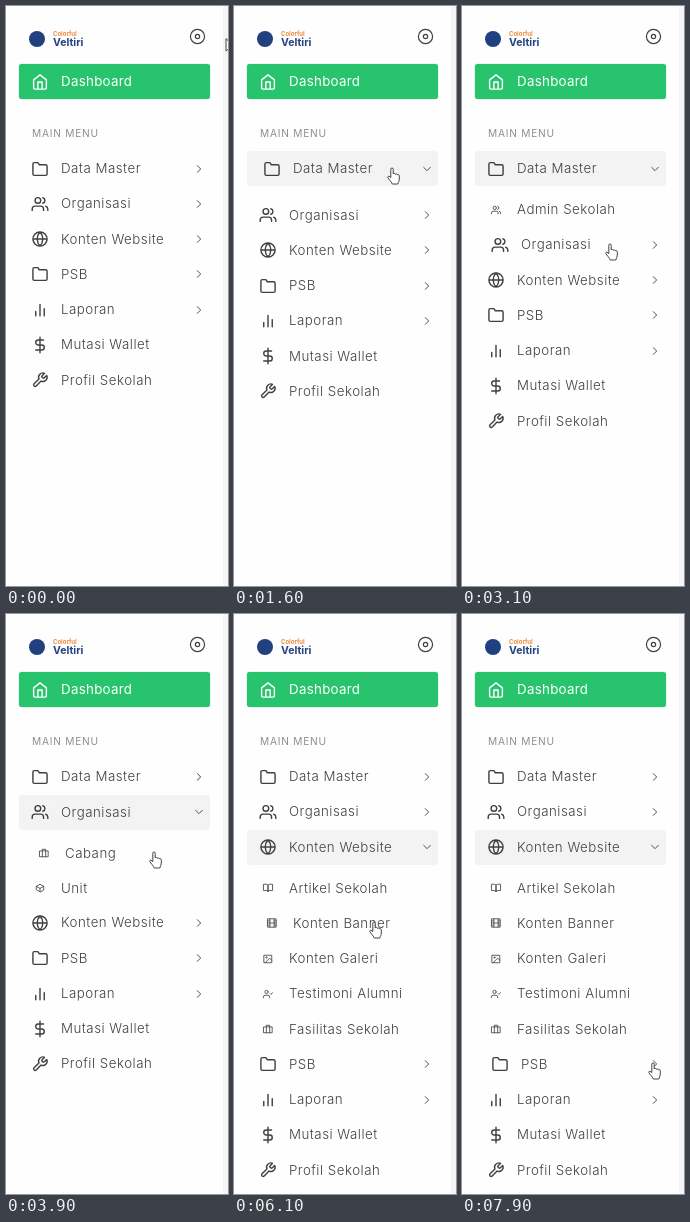
These frames come from a looping animation (222x580 px, 8000 ms). An HTML page:

```html
<!DOCTYPE html>
<html lang="id">
<head>
<meta charset="utf-8">
<title>Sidebar menu</title>
<style>
html, body { margin: 0; width: 100%; height: 100%; overflow: hidden; background: #fefefe; }
body { position: relative; font: 300 13.3px/35.25px Inter, sans-serif; letter-spacing: .5px; color: #404044; }
body > * { position: absolute; }
svg { fill: none; stroke: currentColor; stroke-width: 2; stroke-linecap: round; stroke-linejoin: round; overflow: visible; }
.edge { left: 217px; top: 0; width: 5px; height: 100%; background: #f5f5f5; }
.mark { left: 23px; top: 25px; width: 16px; height: 16px; border-radius: 50%; background: #20407f; }
.brand { left: 47px; white-space: nowrap; font-weight: 700; letter-spacing: 0; }
.small { top: 24px; font-size: 6px; line-height: 8px; color: #f08a3c; }
.big { top: 30px; font-size: 10.5px; line-height: 13px; color: #20407f; }
.target { left: 183.2px; top: 22.3px; stroke-width: 1.7; }
.title { left: 26px; top: 119px; font-size: 10.2px; line-height: 17px; font-weight: 400; letter-spacing: .75px; color: #8e8e92; }
#menu { left: 13px; top: 145px; width: 191px; }
.row { position: relative; height: 35.25px; border-radius: 3px; white-space: nowrap; }
.row .label { position: absolute; left: 42px; }
.row .icon { position: absolute; top: 17.6px; left: 21px; transform: translate(-50%, -50%); }
.row .arrow { position: absolute; left: 175.3px; top: 12.6px; stroke-width: 2.2; }
.home { left: 13px; top: 58px; width: 191px; background: #27c46d; box-shadow: 0 0 1px #27c46d; color: #fff; font-weight: 400; letter-spacing: .3px; }
.sub { overflow: hidden; height: 0; }
.sub .row:first-child { margin-top: 5.8px; }
#cursor { left: 0; top: 0; color: #444; stroke-width: 1; }
#cursor path { fill: #fff; }
</style>
</head>
<body>
<div class="edge"></div>
<div class="mark"></div>
<div class="brand small">Colorful</div>
<div class="brand big">Veltiri</div>
<svg class="target" width="17" height="17" viewBox="0 0 24 24"><circle cx="12" cy="12" r="10"/><circle cx="12" cy="12" r="3"/></svg>
<div class="title">MAIN MENU</div>
<div id="menu"></div>
<svg id="cursor" width="14" height="18">
  <path id="pointer" d="M0 0V12L3 9.5 5 14 7 13 5 8.7H9Z"/>
  <path id="hand" d="M-.2 9V1.2a1.2 1.2 0 0 1 2.4 0V6c.2-1 2.2-.8 2.2.4 .3-.8 2.1-.6 2.1.5 .4-.6 1.8-.4 1.8.8V11c0 2-1 3-1.5 5H1.3C.3 13.5-2.2 11.5-3.2 9.5-3.7 8.3-2.1 7.6-.2 9.4"/>
</svg>
<script>
const icons = {
  home: 'M3 9l9-7 9 7v11a2 2 0 0 1-2 2H5a2 2 0 0 1-2-2zM9 22V12h6v10',
  folder: 'M22 19a2 2 0 0 1-2 2H4a2 2 0 0 1-2-2V5a2 2 0 0 1 2-2h5l2 3h9a2 2 0 0 1 2 2z',
  users: 'M17 21v-2a4 4 0 0 0-4-4H5a4 4 0 0 0-4 4v2M13 7a4 4 0 1 1-8 0 4 4 0 0 1 8 0M23 21v-2a4 4 0 0 0-3-3.87M16 3.13a4 4 0 0 1 0 7.75',
  globe: 'M22 12a10 10 0 1 1-20 0 10 10 0 0 1 20 0zH2M12 2a15.3 15.3 0 0 1 4 10 15.3 15.3 0 0 1-4 10 15.3 15.3 0 0 1-4-10 15.3 15.3 0 0 1 4-10z',
  bars: 'M18 20V10M12 20V4M6 20v-6',
  dollar: 'M12 1v22M17 5H9.5a3.5 3.5 0 0 0 0 7h5a3.5 3.5 0 0 1 0 7H6',
  tool: 'M14.7 6.3a1 1 0 0 0 0 1.4l1.6 1.6a1 1 0 0 0 1.4 0l3.77-3.77a6 6 0 0 1-7.94 7.94l-6.91 6.91a2.12 2.12 0 0 1-3-3l6.91-6.91a6 6 0 0 1 7.94-7.94l-3.76 3.76z',
  bag: 'M2 7h20v14H2zM16 21V3H8v18',
  box: 'M21 16V8l-9-5-9 5v8l9 5zM3 8l9 5 9-5M12 21V13',
  book: 'M2 3h6a4 4 0 0 1 4 4v14a3 3 0 0 0-3-3H2zM22 3h-6a4 4 0 0 0-4 4v14a3 3 0 0 1 3-3h7z',
  film: 'M2 2h20v20H2zM7 2v20M17 2v20M2 12h20M2 7h5M2 17h5M17 17h5M17 7h5',
  image: 'M3 3h18v18H3zM10 8.5a1.5 1.5 0 1 1-3 0 1.5 1.5 0 0 1 3 0M21 15l-5-5L5 21',
  check: 'M16 21v-2a4 4 0 0 0-4-4H5a4 4 0 0 0-4 4v2M12.5 7a4 4 0 1 1-8 0 4 4 0 0 1 8 0M17 11l2 2 4-4'
};

// icon, label, submenu, [open time, close time]
const items = [
  ['folder', 'Data Master', [['users', 'Admin Sekolah']], [1480, 3570]],
  ['users', 'Organisasi', [['bag', 'Cabang'], ['box', 'Unit']], [3570, 5610]],
  ['globe', 'Konten Website', [['book', 'Artikel Sekolah'], ['film', 'Konten Banner'], ['image', 'Konten Galeri'],
    ['check', 'Testimoni Alumni'], ['bag', 'Fasilitas Sekolah']], [5610, 1e5]],
  ['folder', 'PSB', []],
  ['bars', 'Laporan', []],
  ['dollar', 'Mutasi Wallet'],
  ['tool', 'Profil Sekolah']
];

// label: [enter, leave]
const hovers = {
  'Data Master': [950, 2740], 'Admin Sekolah': [2740, 2860], 'Organisasi': [2860, 3680],
  'Cabang': [3680, 4730], 'Unit': [4730, 4880], 'Konten Website': [4880, 5720],
  'Konten Banner': [5720, 6640], 'Konten Galeri': [6640, 6850], 'Testimoni Alumni': [6850, 7200],
  'Fasilitas Sekolah': [7200, 7420], 'PSB': [7420, 1e5]
};

// time, x, y
const path = [[100, 220, 33], [950, 172, 150], [1250, 157, 162], [2600, 157, 162], [3050, 147, 238], [4550, 147, 238],
  [5050, 139, 308], [6450, 139, 308], [6900, 161, 373], [7200, 170, 395], [7600, 190, 449]];

const ease = p => (p = Math.min(1, Math.max(0, p)), p * p * (3 - 2 * p));
const during = (t, [from, to], length) => ease((t - from) / length) - ease((t - to) / length);
const $ = id => document.getElementById(id);
const add = (parent, cls, html = '') => {
  const el = document.createElement('div');
  el.className = cls;
  el.innerHTML = html;
  return parent.appendChild(el);
};

const shifts = [], folds = [];
function addRow(parent, icon, label, size, cls = 'row') {
  const row = add(parent, cls, `<div><svg class="icon" width="${size}" height="${size}" viewBox="0 0 24 24"><path d="${icons[icon]}"/></svg><span class="label">${label}</span></div>`);
  if (hovers[label]) shifts.push([row.firstChild, hovers[label]]);
  return row;
}

addRow(document.body, 'home', 'Dashboard', 17, 'row home');
for (const [icon, label, subs, span] of items) {
  const row = addRow($('menu'), icon, label, 17);
  if (subs) row.insertAdjacentHTML('beforeend', '<svg class="arrow" width="10" height="10" viewBox="0 0 24 24"><path d="M8 4l8 8-8 8"/></svg>');
  if (!span) continue;
  const sub = add($('menu'), 'sub');
  subs.forEach(s => addRow(sub, s[0], s[1], 10));
  folds.push({ row, sub, span, height: 5.8 + 35.25 * subs.length });
}
document.body.append($('cursor'));

function cursorAt(t) {
  const i = path.findIndex(p => p[0] > t);
  if (i < 1) return (i ? path[path.length - 1] : path[0]).slice(1);
  const a = path[i - 1], b = path[i], k = ease((t - a[0]) / (b[0] - a[0]));
  return [1, 2].map(n => a[n] + (b[n] - a[n]) * k);
}

function draw(t) {
  for (const { row, sub, span, height } of folds) {
    const k = during(t, span, 350), early = Math.min(1, k * 4);
    sub.style.height = height * k + 'px';
    row.style.background = `rgba(0,0,0,${.045 * early})`;
    row.querySelector('.arrow').style.transform = `rotate(${90 * early}deg)`;
  }
  for (const [el, span] of shifts) el.style.transform = `translateX(${4 * during(t, span, 180)}px)`;
  const [x, y] = cursorAt(t), onItem = t >= 950;
  $('cursor').style.transform = `translate(${x}px,${y}px)`;
  $('hand').style.display = onItem ? '' : 'none';
  $('pointer').style.display = onItem ? 'none' : '';
}

function frame() {
  draw(performance.now() % 8000);
  requestAnimationFrame(frame);
}
frame();
</script>
</body>
</html>
```
